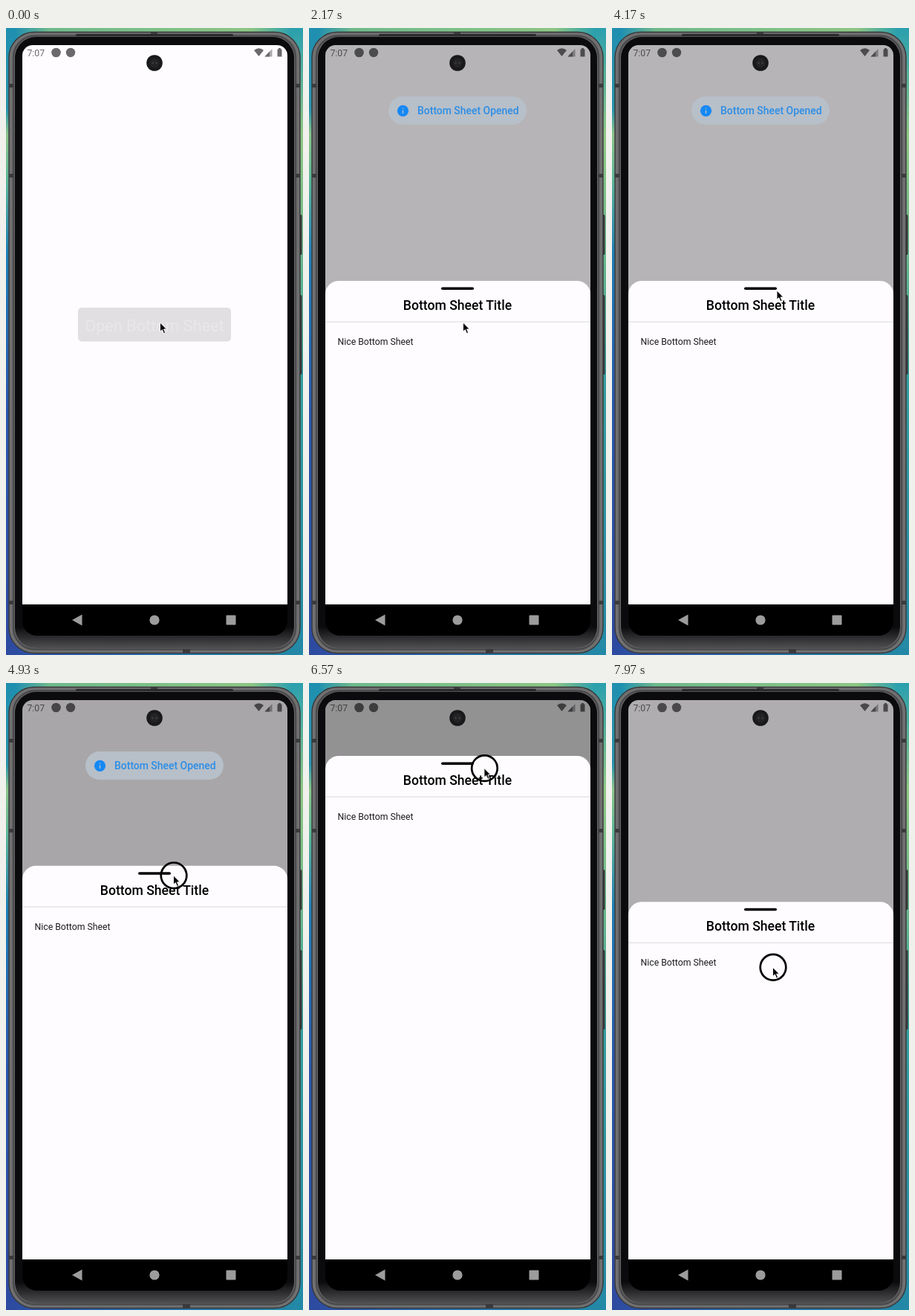
Recreate the animation shown at these times as an HTML page. Size 400 px wide and 843 px high, loop 8000 ms.

```html
<!DOCTYPE html>
<html lang="en">
<head>
<meta charset="utf-8">
<title>Bottom sheet</title>
<style>
  html, body { margin: 0; width: 100%; height: 100%; overflow: hidden; background: #2d4aa0; }
  svg { display: block; width: 100%; height: 100%; }
  text { font-family: Roboto, sans-serif; }
  .mid { text-anchor: middle; }
  .bold { font-weight: 500; }
</style>
</head>
<body>
<svg viewBox="0 0 400 843">
  <defs>
    <linearGradient id="left" x2="0" y2="1">
      <stop offset="0" stop-color="#1f8fb0"/><stop offset=".13" stop-color="#2a94ac"/>
      <stop offset=".17" stop-color="#8cc48a"/><stop offset=".24" stop-color="#5fb798"/>
      <stop offset=".36" stop-color="#1f7fb5"/><stop offset=".6" stop-color="#2a58ae"/>
      <stop offset="1" stop-color="#2d4aa0"/>
    </linearGradient>
    <linearGradient id="right" x2="0" y2="1">
      <stop offset="0" stop-color="#2a9fae"/><stop offset=".17" stop-color="#8fc884"/>
      <stop offset=".35" stop-color="#6fba8c"/><stop offset=".55" stop-color="#35a0a0"/>
      <stop offset="1" stop-color="#2389a6"/>
    </linearGradient>
    <linearGradient id="top">
      <stop offset="0" stop-color="#2391ae"/><stop offset=".12" stop-color="#6fb98c"/>
      <stop offset=".85" stop-color="#8cc684"/><stop offset="1" stop-color="#2a9fae"/>
    </linearGradient>
    <linearGradient id="bottom">
      <stop offset="0" stop-color="#2d4aa0"/><stop offset=".5" stop-color="#2670ae"/>
      <stop offset="1" stop-color="#2389a6"/>
    </linearGradient>
    <linearGradient id="chin" x2="0" y2="1">
      <stop offset=".965" stop-color="#0b0b0d"/><stop offset="1" stop-color="#505052"/>
    </linearGradient>
    <clipPath id="screen"><path d="M22 775V37a14 14 0 0 1 14-14H365a14 14 0 0 1 14 14V775Z"/></clipPath>
    <clipPath id="pillClip"><rect id="pillMask" y="92" height="38" rx="19"/></clipPath>
  </defs>

  <rect width="200" height="843" fill="url(#left)"/>
  <rect x="200" width="200" height="843" fill="url(#right)"/>
  <rect x="14" width="372" height="40" fill="url(#top)"/>
  <rect y="833" width="400" height="10" fill="url(#bottom)"/>

  <g fill="#343436">
    <rect x="393" y="251" width="5.5" height="54" rx="1.5"/>
    <rect x="393" y="359" width="5.5" height="107" rx="1.5"/>
  </g>
  <rect x="4" y="5.5" width="392" height="835" rx="34" fill="#707071" stroke="#38383a" stroke-width="1.4"/>
  <rect x="10" y="10.500" width="380" height="825" rx="29" fill="none" stroke="#4a4a4c" stroke-width="2.500"/>
  <g fill="#3a3a3c">
    <rect x="4" y="75" width="6" height="5"/><rect x="390" y="75" width="6" height="5"/>
    <rect x="4" y="196" width="6" height="5"/><rect x="390" y="196" width="6" height="5"/>
    <rect x="4" y="770" width="6" height="5"/><rect x="390" y="770" width="6" height="5"/>
    <rect x="195" y="5" width="9" height="6"/><rect x="238" y="835" width="10" height="6"/>
  </g>
  <rect x="12" y="12" width="376" height="822" rx="28" fill="url(#chin)"/>
  <rect x="94" y="8" width="212" height="3" rx="1.5" fill="#2a2a2c"/>
  <path d="M22 770H379V797a20 20 0 0 1-20 20H42a20 20 0 0 1-20-20Z"/>
  <g fill="#9c9c9c">
    <path d="M89 796L102.500 788.500V803.500Z"/>
    <circle cx="200" cy="796" r="6.600"/>
    <rect x="296.500" y="789.500" width="13" height="13" rx="1"/>
  </g>

  <g clip-path="url(#screen)">
    <rect x="22" y="23" width="357" height="752" fill="#fefcff"/>
    <g fill="#6b696c">
      <text x="28.500" y="38" font-size="12.200">7:07</text>
      <circle cx="67.500" cy="33" r="6.300"/>
      <circle cx="87" cy="33" r="6.200"/>
      <path d="M334 30Q340.500 24.500 347 30L340.500 38Z"/>
      <path d="M348.500 38.500L358.500 28V38.500Z" opacity=".55"/>
      <path d="M348.500 38.500L355 31.500V38.500Z"/>
      <path d="M365.500 28.500h1.500v-1.500h3v1.500h1.500v10h-6Z"/>
    </g>
    <rect x="97" y="376" width="206" height="45.500" rx="5" fill="#e1dfe2"/>
    <text class="mid" x="200" y="407.500" font-size="21.700" fill="#e9e7ea">Open Bottom Sheet</text>
    <rect id="shade" x="22" y="23" width="357" height="752"/>

    <g id="sheet">
      <path d="M22 800V18a18 18 0 0 1 18-18H361a18 18 0 0 1 18 18V800Z" fill="#fefcff"/>
      <rect x="178" y="8.500" width="44" height="3.500" rx="1.750"/>
      <text class="mid bold" x="200" y="39" font-size="17.600">Bottom Sheet Title</text>
      <rect x="22" y="54.500" width="357" height="1.200" fill="#e0dee1"/>
      <text x="38.500" y="86" font-size="12.250" fill="#1c1b1f">Nice Bottom Sheet</text>
    </g>

    <g id="toast">
      <rect id="pill" y="92" height="38" rx="19" fill="#b7bfc9"/>
      <g clip-path="url(#pillClip)">
        <text id="label" class="bold" y="116.300" font-size="13.950" fill="#2c8ee6">Bottom Sheet Opened</text>
      </g>
      <g id="info">
        <circle r="7.600" fill="#1488f5"/>
        <path d="M0-.8V3.800M0-3.900V-2.500" stroke="#b7bfc9" stroke-width="1.400"/>
      </g>
    </g>
  </g>

  <circle cx="200" cy="47" r="10.800" fill="#19191b"/>
  <circle cx="200" cy="47" r="6.500" fill="#232326"/>
  <circle cx="197.500" cy="47" r="1.500" fill="#39393c"/>
  <circle cx="202.500" cy="47" r="1.500" fill="#39393c"/>

  <g id="mouse">
    <circle id="ring" cx=".5" cy="1" r="17.300" fill="none" stroke="#000" stroke-width="2.700"/>
    <path d="M0 1V13.200L2.800 10.600L5 15.600L7.100 14.700L5 9.900H8.800Z" stroke="#fff" stroke-width=".9"/>
  </g>
</svg>
<script>
const LOOP = 8000;
const el = id => document.getElementById(id);
const clamp = v => Math.min(1, Math.max(0, v));
const mix = (a, b, k) => a + (b - a) * k;
const span = (t, a, b) => clamp((t - a) / (b - a));
const smooth = k => k * k * (3 - 2 * k);
const easeOut = k => 1 - (1 - k) ** 3;
const move = (node, x, y) => node.setAttribute('transform', `translate(${x} ${y})`);

// Monotone cubic through [time, value] keys
function track(keys) {
  const slope = i => (keys[i + 1][1] - keys[i][1]) / (keys[i + 1][0] - keys[i][0]);
  const last = keys.length - 1;
  const tangent = i => {
    if (i === 0) return slope(0);
    if (i === last) return slope(last - 1);
    const a = slope(i - 1), b = slope(i);
    return a * b <= 0 ? 0 : 2 * a * b / (a + b);
  };
  return t => {
    if (t <= keys[0][0]) return keys[0][1];
    if (t >= keys[last][0]) return keys[last][1];
    const i = keys.findIndex(k => k[0] > t) - 1;
    const [t0, v0] = keys[i], [t1, v1] = keys[i + 1];
    const d = t1 - t0, s = (t - t0) / d, r = 1 - s;
    return v0 * (1 + 2 * s) * r * r + v1 * s * s * (3 - 2 * s)
      + d * (tangent(i) * s * r * r - tangent(i + 1) * s * s * r);
  };
}

const dragY = track([[4200, 340], [4400, 338], [4930, 246], [5700, 102], [6050, 98],
  [6700, 98], [7170, 134], [7970, 294], [8000, 299]]);
const mouseX = track([[2300, 207.5], [3000, 223], [4200, 222], [4930, 225.5], [5700, 234.5],
  [6300, 236], [7170, 235.5], [7970, 216.5]]);
const mouseY = track([[2300, 395], [3000, 391.5], [3900, 352], [4200, 352], [4400, 350],
  [4930, 258], [5700, 117], [6050, 110], [6600, 114], [7170, 169], [7970, 381], [8000, 387]]);

const [shade, sheet, toast, pill, pillMask, label, info, mouse, ring] =
  ['shade', 'sheet', 'toast', 'pill', 'pillMask', 'label', 'info', 'mouse', 'ring'].map(el);

function draw(t) {
  const top = t < 4200 ? mix(775, 340, easeOut(span(t, 150, 700))) : dragY(t);
  move(sheet, 0, top);
  const dim = top > 340 ? .287 * (775 - top) / 435 : .287 + .00056 * (340 - top);
  shade.setAttribute('opacity', dim);

  const open = smooth(span(t, 1620, 2000)) * (1 - smooth(span(t, 5300, 5650)));
  const half = mix(19, 93, open);
  for (const box of [pill, pillMask]) {
    box.setAttribute('x', 200 - half);
    box.setAttribute('width', half * 2);
  }
  const iconX = mix(200, 126.5, open);
  move(info, iconX, 111.3);
  label.setAttribute('x', iconX + 19.5);
  label.setAttribute('opacity', open);
  toast.setAttribute('opacity', span(t, 1300, 1510) * (1 - span(t, 5730, 5950)));

  move(mouse, mouseX(t), mouseY(t));
  ring.setAttribute('opacity', t >= 4200 ? 1 : 0);
}

function tick() {
  draw(performance.now() % LOOP);
  requestAnimationFrame(tick);
}
tick();
</script>
</body>
</html>
```
